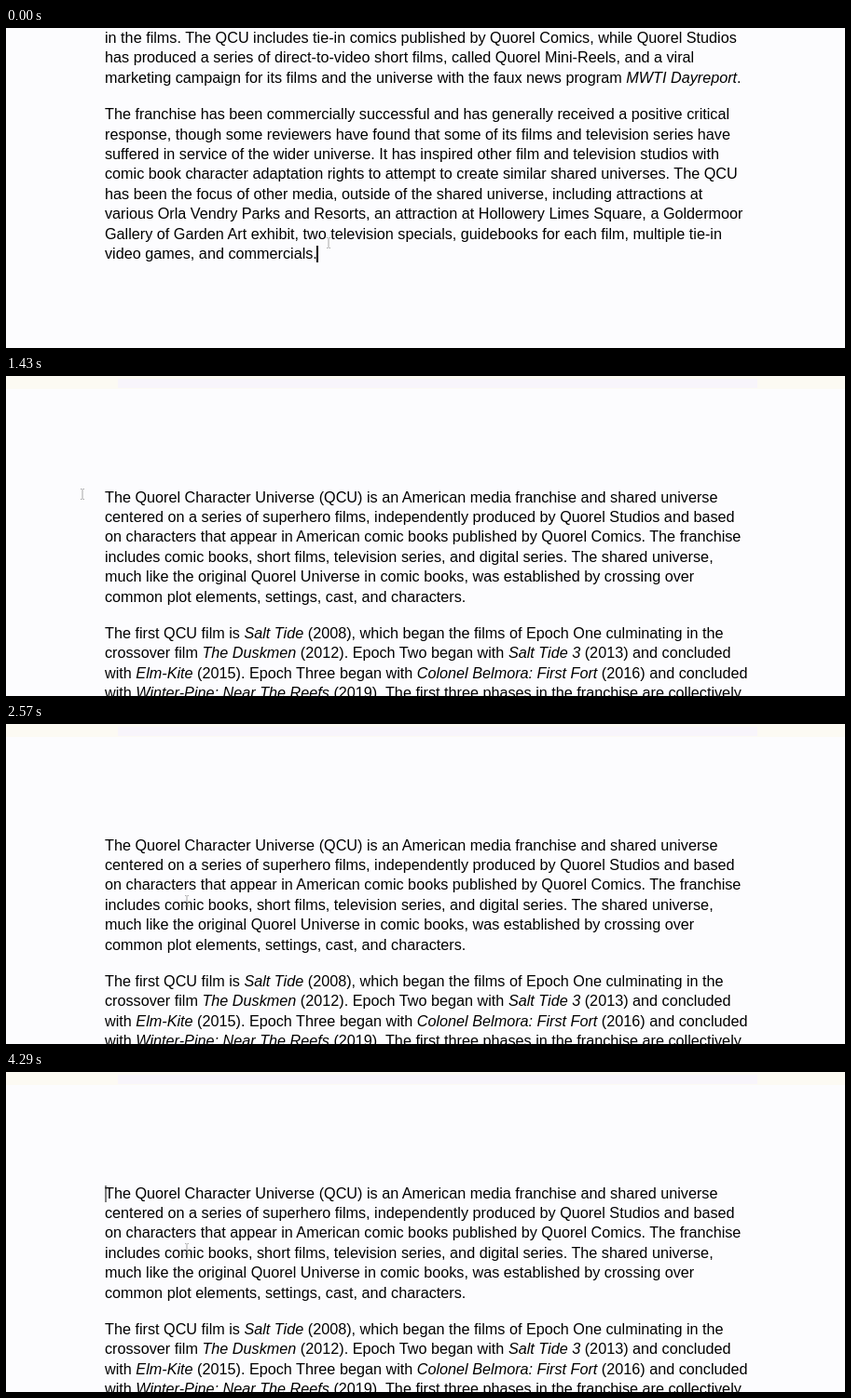
Write an HTML page that moves like this. It is 900 by 344 pixels and loops after 4440 ms.

```html
<!DOCTYPE html>
<html lang="en">
<head>
<meta charset="utf-8">
<title>Scrolling to the start of a document</title>
<style>
  html, body { margin: 0; width: 100%; height: 100%; overflow: hidden; background: #fcfcfe; }
  #stage { position: relative; width: 900px; height: 344px; overflow: hidden; }
  #doc { position: absolute; left: 0; top: 0; width: 900px; height: 920px; }
  #gap { position: absolute; left: 0; top: 0; width: 900px; height: 14px; background: #fcfaf3; }
  #gap::after { content: ""; position: absolute; left: 120px; top: 3px; width: 686px; height: 10px; background: #f8f5fb; }
  #text { position: absolute; left: 106px; top: 119.5px; color: #000;
    font: 16.22px/21.4px "Liberation Sans", Arial, sans-serif; white-space: pre; }
  p { margin: 0 0 17.9px; }
  #caret { position: absolute; width: 2px; height: 18px; background: #000; }
  #mouse { position: absolute; left: -3px; top: -6px; }
</style>
</head>
<body>
<div id="stage">
  <div id="doc">
    <div id="gap"></div>
    <div id="text"><p>The Quorel Character Universe (QCU) is an American media franchise and shared universe
centered on a series of superhero films, independently produced by Quorel Studios and based
on characters that appear in American comic books published by Quorel Comics. The franchise
includes comic books, short films, television series, and digital series. The shared universe,
much like the original Quorel Universe in comic books, was established by crossing over
common plot elements, settings, cast, and characters.</p><p>The first QCU film is <i>Salt Tide</i> (2008), which began the films of Epoch One culminating in the
crossover film <i>The Duskmen</i> (2012). Epoch Two began with <i>Salt Tide 3</i> (2013) and concluded
with <i>Elm-Kite</i> (2015). Epoch Three began with <i>Colonel Belmora: First Fort</i> (2016) and concluded
with <i>Winter-Pine: Near The Reefs</i> (2019). The first three phases in the franchise are collectively
known as "The Cobalt Saga". The films of Epoch Four will begin with <i>Coral Garnet</i> (2021) and
are set to conclude with <i>Merchants of the Harbor Vol. 3</i> (2023).</p><p>The studio expanded the universe to network television with a weekly drama in 2013,
before further expanding to streaming television with a group of darker stories set
in one city, and to cable television with a series about two young runaways. A new
division later began to develop limited series of its own, each one tied closely to
the events of the films and sharing the same cast. Soundtrack albums have been
released for all of the films, along with many of the television series, as well as the
release of compilation albums containing existing music that can be heard
in the films. The QCU includes tie-in comics published by Quorel Comics, while Quorel Studios
has produced a series of direct-to-video short films, called Quorel Mini-Reels, and a viral
marketing campaign for its films and the universe with the faux news program <i>MWTI Dayreport</i>.</p><p>The franchise has been commercially successful and has generally received a positive critical
response, though some reviewers have found that some of its films and television series have
suffered in service of the wider universe. It has inspired other film and television studios with
comic book character adaptation rights to attempt to create similar shared universes. The QCU
has been the focus of other media, outside of the shared universe, including attractions at
various Orla Vendry Parks and Resorts, an attraction at Hollowery Limes Square, a Goldermoor
Gallery of Garden Art exhibit, two television specials, guidebooks for each film, multiple tie-in
video games, and commercials.</p></div>
    <div id="caret"></div>
  </div>
  <svg id="mouse" width="6" height="12" viewBox="0 0 6 12" fill="none" stroke="#8c8c8c" stroke-opacity=".75">
    <path d="M1 .5H2.5M3.5 .5H5M3 1V11M1 11.5H2.5M3.5 11.5H5"/>
  </svg>
</div>
<script>
const LOOP = 4440;
const CLICK = 1860;

// [ms, value...], each held until the next step
const scrollSteps = [[0, 562], [140, 455], [290, 190], [430, 40], [570, 0]];
const mouseSteps = [
  [0, 346, 231], [710, 330, 222], [860, 270, 195], [1000, 190, 160], [1140, 120, 136],
  [1290, 88, 128], [1430, 82, 127], [1570, 84, 128], [1710, 94, 133], [1860, 104, 138],
  [2290, 122, 152], [2430, 165, 176], [2570, 194, 190]
];
const blinkSteps = [[0, .3], [140, .8], [280, 1], [430, .5], [570, .2], [710, 0]];

const doc = document.getElementById("doc");
const caret = document.getElementById("caret");
const mouse = document.getElementById("mouse");

function at(steps, t) {
  let found = steps[0];
  for (const step of steps) if (step[0] <= t) found = step;
  return found.slice(1);
}

function draw(t) {
  const [scroll] = at(scrollSteps, t);
  const [x, y] = at(mouseSteps, t);
  const clicked = t >= CLICK;
  doc.style.transform = `translateY(${-scroll}px)`;
  mouse.style.transform = `translate(${x}px, ${y}px)`;
  caret.style.left = clicked ? "106px" : "333px";
  caret.style.top = clicked ? "122px" : "796px";
  caret.style.opacity = clicked ? at(blinkSteps, (t - CLICK) % 1000)[0] : 1;
}

const start = performance.now();
function tick() {
  draw((performance.now() - start) % LOOP);
  requestAnimationFrame(tick);
}
tick();
</script>
</body>
</html>
```
